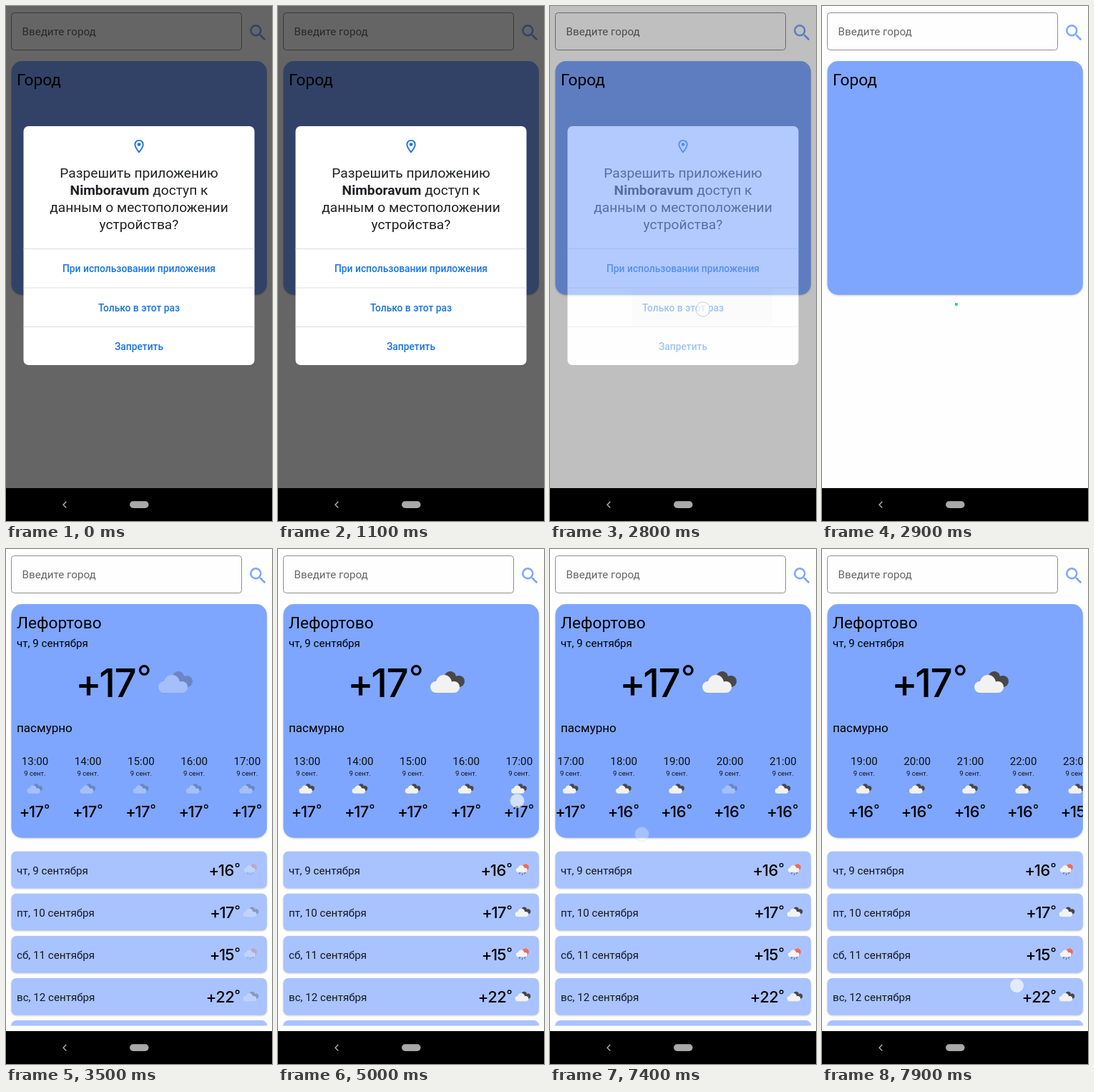
Animation, 372 px wide and 720 px high, one loop 8 s. Source, as an HTML page:

```html
<!DOCTYPE html>
<html lang="ru">
<head>
<meta charset="utf-8">
<style>
  html, body { margin: 0; width: 100%; height: 100%; overflow: hidden; background: #fefefe; }
  svg { display: block; width: 100%; height: 100%; font-family: Roboto, "Noto Sans", sans-serif; }
  .temp { font-family: Inter, Lato, sans-serif; font-weight: 500; text-anchor: middle; }
  .mid { text-anchor: middle; }
  .button { font-size: 13.8px; font-weight: 500; fill: #1a73e8; text-anchor: middle; }
  .question { font-size: 19.2px; fill: #202124; text-anchor: middle; }
  .lift { filter: drop-shadow(0 1px 1px rgba(0, 0, 0, .22)); }
</style>
</head>
<body>
<svg id="stage" viewBox="0 0 372 720"></svg>
<script>
const LOOP = 8000, STEP = 100;
const DISMISS = 2700, SPIN = 2900, LOADED = 3400, PRESS = 4800, DRAG = 6900, RELEASE = 7300;
const PITCH = 74.2, ROW_PITCH = 59.1;
const BLUE = '#7ea6ff', PALE = '#a8c3ff';
const ADVANCE = { '+': .57, 1: .35, 2: .57, 5: .57, 6: .62, 7: .55, '°': .37 };

const clamp = v => Math.min(1, Math.max(0, v));
const smooth = v => v * v * (3 - 2 * v);
const text = (x, y, size, str, extra = '') =>
  `<text x="${x}" y="${y}" font-size="${size}" ${extra}>${str}</text>`;
const dot = (x, y, r, fill) => `<circle cx="${x}" cy="${y}" r="${r}" fill="${fill}"/>`;
const box = (x, y, w, h, r, fill, extra = '') =>
  `<rect x="${x}" y="${y}" width="${w}" height="${h}" rx="${r}" fill="${fill}" ${extra}/>`;

// Temperature such as +17°, set from a left edge
const tempWidth = (str, size) => [...str].reduce((w, c) => w + ADVANCE[c] * size, 0);
function temp(x, y, size, str) {
  let out = '';
  for (const c of str) {
    const w = ADVANCE[c] * size, cx = x + w / 2;
    out += c === '°'
      ? `<circle cx="${cx}" cy="${y - .66 * size}" r="${.102 * size}" fill="none" stroke="#000" stroke-width="${.058 * size}"/>`
      : text(cx, y, size * .963, c, 'class="temp"');
    x += w;
  }
  return out;
}

const cloud = fill => dot(-16, 6, 8, fill) + dot(-5, 0, 11, fill) + dot(9, 6, 8, fill) +
  box(-16, 3, 25, 11, 0, fill);
const darkCloud = dot(4, -8, 8, '#48484a') + dot(16, -2, 8, '#48484a') + box(2, -6, 14, 12, 0, '#48484a');
const drops = [-9, -1, 7].map((x, i) =>
  `<path d="M${x} ${8 + i % 2 * 3}l-2 5" stroke="#55575c" stroke-width="2.4"/>`).join('');
const rain = dot(8, -8, 10.5, '#ec6e4c') +
  `<g transform="translate(-1 -5) scale(.85)">${cloud('#f4f4f6')}</g>` + drops;
const icon = (x, y, scale, kind, id = '') =>
  `<g class="icon" ${id} transform="translate(${x} ${y}) scale(${scale})">` +
  (kind === 'rain' ? rain : darkCloud + cloud('#f2f2f2')) + '</g>';

function hourColumn(i) {
  const x = 40.5 + i * PITCH;
  const t = i < 5 ? '+17°' : i < 10 ? '+16°' : '+15°';
  return text(x, 302, 15.15, `${13 + i}:00`, 'class="mid" fill="#111"') +
    text(x, 316.6, 9.5, '9 сент.', 'class="mid" fill="#111"') +
    icon(x - .3, 335.5, .45, 'cloud', `data-hour="${13 + i}"`) +
    temp(x - tempWidth(t, 22.7) / 2, 375, 22.7, t);
}

const days = [
  ['чт, 9 сентября', '+16°', 'rain'],
  ['пт, 10 сентября', '+17°', 'cloud'],
  ['сб, 11 сентября', '+15°', 'rain'],
  ['вс, 12 сентября', '+22°', 'cloud'],
  ['пн, 13 сентября', '+21°', 'cloud']
];
function dayRow([name, t, kind], i) {
  const y = 422.7 + i * ROW_PITCH;
  return box(7.5, y, 357.3, 51.5, 7, PALE, 'class="lift"') +
    text(15, y + 32, 15.15, name, 'fill="#15181f"') +
    temp(327.8 - tempWidth(t, 22.7), y + 34.3, 22.7, t) +
    icon(342.5, y + 26, .45, kind);
}

const stage = document.getElementById('stage');
stage.innerHTML = `
<defs>
  <clipPath id="hourClip"><rect x="7.5" y="280" width="357.3" height="110"/></clipPath>
  <clipPath id="listClip"><rect x="0" y="415" width="372" height="251.5"/></clipPath>
</defs>
${box(0, 0, 372, 674, 0, '#fefefe')}
${box(7.5, 9.5, 322, 52, 4, 'none', 'stroke="#8d8d8d"')}
${text(22.6, 41, 15.15, 'Введите город', 'fill="#666"')}
<path transform="translate(337.2 22.2) scale(1.27)" fill="${BLUE}" d="M15.5 14h-.79l-.28-.27A6.47 6.47 0 0 0 16 9.5 6.5 6.5 0 1 0 9.5 16c1.61 0 3.09-.59 4.23-1.57l.27.28v.79l5 4.99L20.49 19zm-6 0a4.5 4.5 0 1 1 0-9 4.5 4.5 0 0 1 0 9z"/>
${box(7.5, 77, 357.3, 326.7, 15, BLUE, 'class="lift"')}
${text(15, 110.5, 22.7, 'Город', 'id="city"')}
<circle id="spinner" cx="186" cy="434.5" r="17.6" fill="none" stroke="#12cdbb" stroke-width="3.8" pathLength="1"/>
<g id="weather">
  ${text(15, 136.8, 15.15, 'чт, 9 сентября')}
  ${temp(99.3, 207, 56.8, '+17°')}
  ${icon(237, 187, 1, 'cloud')}
  ${text(15, 256.2, 17.05, 'пасмурно')}
  <g clip-path="url(#hourClip)"><g id="hours">${Array.from({ length: 11 }, (_, i) => hourColumn(i)).join('')}</g></g>
  <g clip-path="url(#listClip)">${days.map(dayRow).join('')}</g>
</g>
<g id="dialog">
  ${box(0, 0, 372, 674, 0, '#000', 'opacity=".6"')}
  ${box(24.5, 168, 323, 334, 7, '#fff')}
  ${box(114, 395, 197, 53, 4, '#f7f7f7', 'id="ripple"')}
  <g transform="translate(174.7 185) scale(.947)" fill="#1a73e8">
    <path d="M12 2a7 7 0 0 0-7 7c0 5.25 7 13 7 13s7-7.75 7-13a7 7 0 0 0-7-7zM7 9a5 5 0 0 1 10 0c0 2.88-2.88 7.19-5 9.88C9.92 16.21 7 11.85 7 9z"/>
    <circle cx="12" cy="9" r="2.5"/>
  </g>
  <g class="question">
    <text x="186" y="240">Разрешить приложению</text>
    <text x="186" y="264"><tspan font-weight="700">Nimboravum</tspan> доступ к</text>
    <text x="186" y="288">данным о местоположении</text>
    <text x="186" y="312">устройства?</text>
  </g>
  <path d="M24.5 339.5h323M24.5 394h323M24.5 448.5h323" stroke="#dadce0"/>
  <g class="button">
    <text x="186" y="372.3">При использовании приложения</text>
    <text x="186" y="426.6">Только в этот раз</text>
    <text x="186" y="480.8">Запретить</text>
  </g>
</g>
<circle id="touch" r="10" fill="#fff" fill-opacity=".66" stroke="#9fb0e8" stroke-opacity=".6"/>
${box(0, 674, 372, 46, 0, '#000')}
<path d="M84.3 693l-4.2 4.2 4.2 4.2" fill="none" stroke="#b4b4b4" stroke-width="1.4"/>
${box(173, 692.3, 26.5, 9.6, 4.8, '#a9a9a9')}`;

const part = Object.fromEntries([...stage.querySelectorAll('[id]')].map(e => [e.id, e]));
const icons = [...stage.querySelectorAll('.icon')];
const show = (el, on) => el.setAttribute('visibility', on ? 'visible' : 'hidden');

function drawSpinner(t) {
  const on = t >= SPIN && t < LOADED, age = t - SPIN;
  show(part.spinner, on);
  if (!on) return;
  const arc = Math.max(.034, .75 * smooth(clamp(age / 667)));
  const turn = -90 + age * .23;
  part.spinner.setAttribute('stroke-dasharray', `${arc} 2`);
  part.spinner.setAttribute('transform', `rotate(${turn} 186 434.5)`);
}

// Finger position and strength, or null when lifted
function touchAt(t, drag) {
  if (t >= DISMISS && t < DISMISS + 150) return [214, 424, 1];
  if (t >= PRESS && t < RELEASE + 150) return [334.5 - 206 * drag, 352 + 46.5 * drag, t > RELEASE ? .45 : 1];
  if (t >= 7800) return [272.5, 610.5, 1];
  return null;
}

function draw(t) {
  const dialog = 1 - clamp((t - DISMISS) / 170);
  part.dialog.setAttribute('opacity', dialog);
  show(part.dialog, dialog > 0);
  show(part.ripple, t >= DISMISS && dialog > 0);

  drawSpinner(t);
  const loaded = t >= LOADED;
  part.city.textContent = loaded ? 'Лефортово' : 'Город';
  show(part.weather, loaded);
  const fade = clamp((t - LOADED) / 300);
  for (const el of icons) {
    el.setAttribute('opacity', el.dataset.hour === '20' ? clamp((t - 7350) / 150) : fade);
  }

  const drag = clamp((t - DRAG) / (RELEASE - DRAG)) ** 2;
  const fling = t > RELEASE ? 227 * (1 - Math.exp((RELEASE - t) / 167)) : 0;
  part.hours.setAttribute('transform', `translate(${-206 * drag - fling} 0)`);

  const touch = touchAt(t, drag);
  show(part.touch, touch);
  if (touch) {
    part.touch.setAttribute('cx', touch[0]);
    part.touch.setAttribute('cy', touch[1]);
    part.touch.setAttribute('opacity', touch[2]);
  }
}

const start = performance.now();
function tick() {
  const t = (performance.now() - start) % LOOP;
  draw(Math.floor(t / STEP) * STEP);
  requestAnimationFrame(tick);
}
tick();
</script>
</body>
</html>
```
